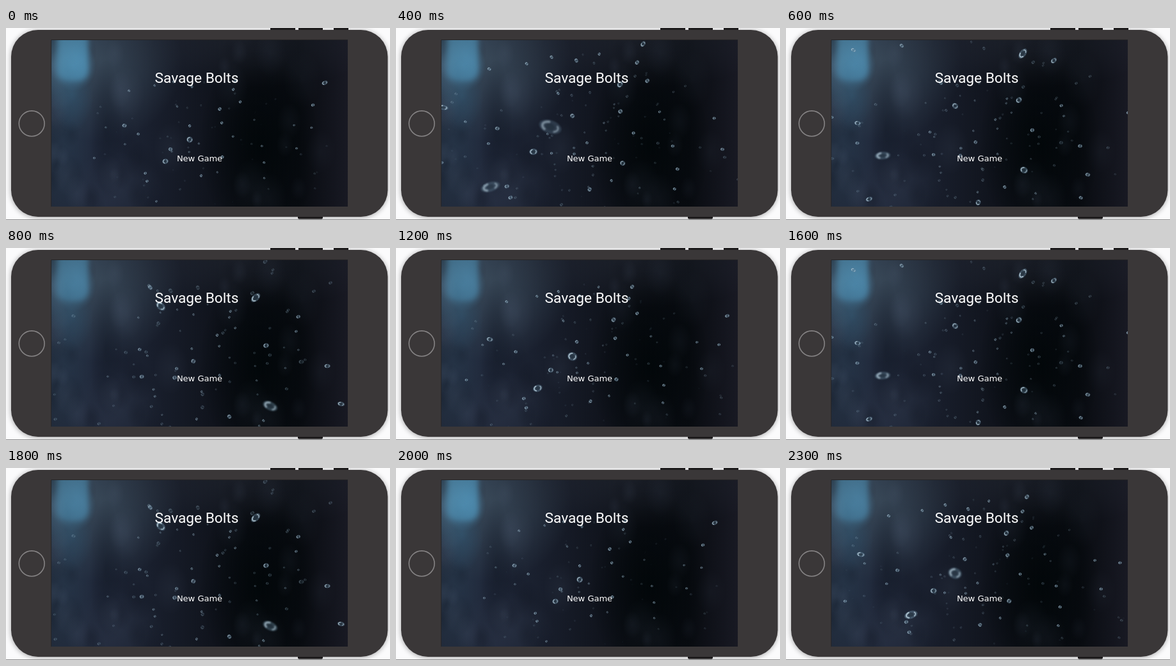
These frames come from a looping animation (600 by 301 pixels, 2400 ms). An HTML page with a canvas:

```html
<!DOCTYPE html>
<html lang="en">
<head>
<meta charset="utf-8">
<title>Game start screen</title>
<style>
  html, body { margin: 0; width: 100%; height: 100%; overflow: hidden; background: #fff; }
  .stage { position: relative; width: 600px; height: 301px; overflow: hidden; }
  svg, canvas { position: absolute; left: 0; top: 0; display: block; }
  canvas { left: 71px; top: 19px; }
  .title { font: 400 22.7px Roboto, Inter, sans-serif; }
  .item { font: 13px "DejaVu Sans", sans-serif; }
  text { fill: #fff; text-anchor: middle; }
</style>
</head>
<body>
<div class="stage">
  <svg width="600" height="301">
    <defs>
      <filter id="soft" x="-10%" y="-10%" width="120%" height="120%">
        <feGaussianBlur stdDeviation="4"/>
      </filter>
    </defs>
    <rect width="600" height="301" fill="#fbfbfc"/>
    <rect x="8" y="4" width="588" height="293" rx="42" opacity=".36" filter="url(#soft)"/>
    <g fill="#1d1b1c">
      <rect x="413" y="-3" width="39" height="9" rx="2"/>
      <rect x="457" y="-3" width="38" height="9" rx="2"/>
      <rect x="512" y="-3" width="23" height="9" rx="2"/>
      <rect x="456" y="293" width="39" height="6.5" rx="2"/>
    </g>
    <path d="M0 300.5H600" stroke="#8b8b8c"/>
    <rect x="8" y="3" width="588.5" height="293" rx="42" fill="#3a3738"/>
    <circle cx="40.2" cy="149.8" r="19.9" fill="none" stroke="#858384" stroke-width="1.6"/>
    <rect x="70.5" y="18.5" width="463.5" height="261.5" fill="#151617"/>
  </svg>
  <canvas id="screen" width="463" height="261"></canvas>
  <svg width="600" height="301">
    <text class="title" x="298" y="85.5">Savage Bolts</text>
    <text class="item" x="302.5" y="209">New Game</text>
  </svg>
</div>
<script>
const LOOP = 2400, CYCLE = 1000, STEP = 100;
const W = 463, H = 261;
const CX = 239, CY = 166;          // vanishing point of the rain

function seeded(seed) {
  return () => (seed = (seed * 16807) % 2147483647) / 2147483647;
}
const clamp = v => Math.max(0, Math.min(1, v));

// Offset from the vanishing point at the start of a cycle,
// and the seconds left until the drop meets the lens.
const drop = (x, y, reach) => ({ x, y, reach });

const leaders = [
  drop(-23, -10, .6), drop(-61, 24, .64), drop(-125, -32, .85),
  drop(-53, 5, .9), drop(24, -58, 1), drop(188, -99, .71)
];

// Random drops spread around the vanishing point, sparser further out.
function scatter(count, seed, near, far) {
  const rand = seeded(seed);
  return Array.from({ length: count }, (_, i) => {
    const angle = i * 2.4 + rand();
    const radius = .15 + .85 * rand();
    return drop(Math.cos(angle) * radius * 205, Math.sin(angle) * radius * 125,
      near + (far - near) * rand());
  });
}

const drops = [...leaders, ...scatter(34, 71, 1.05, 1.75)];
const specks = scatter(70, 7, 1.5, 2.3);

const g = document.getElementById("screen").getContext("2d");

function layer(paint) {
  const c = document.createElement("canvas");
  c.width = W;
  c.height = H;
  paint(c.getContext("2d"));
  return c;
}

function fade(ctx, x, y, rx, ry, rgb, alpha) {
  ctx.save();
  ctx.translate(x, y);
  ctx.scale(rx, ry);
  const grad = ctx.createRadialGradient(0, 0, 0, 0, 0, 1);
  grad.addColorStop(0, `rgba(${rgb},${alpha})`);
  grad.addColorStop(.5, `rgba(${rgb},${alpha * .55})`);
  grad.addColorStop(1, `rgba(${rgb},0)`);
  ctx.fillStyle = grad;
  ctx.fillRect(-1, -1, 2, 2);
  ctx.restore();
}

const backdrop = layer(ctx => {
  const base = ctx.createLinearGradient(0, 0, W, 0);
  ["#212b3b", "#20283a", "#191f2d", "#121620", "#0a0d13", "#080b10", "#181923"]
    .forEach((colour, i, all) => base.addColorStop(i / (all.length - 1), colour));
  ctx.fillStyle = base;
  ctx.fillRect(0, 0, W, H);
  fade(ctx, 75, 30, 130, 130, "70,90,104", .6);
  fade(ctx, 300, 0, 230, 75, "38,43,54", .55);
  fade(ctx, 325, 165, 95, 150, "1,6,8", .85);
  fade(ctx, 85, 140, 26, 110, "12,18,28", .4);
  fade(ctx, 25, 150, 45, 130, "44,66,88", .4);
  fade(ctx, 100, 235, 75, 60, "54,64,84", .35);

  // Drifts of mist, thinning out to the right.
  const rand = seeded(19);
  for (let i = 0; i < 60; i++) {
    const x = W * rand() ** 1.6, size = 8 + 22 * rand();
    fade(ctx, x, H * rand(), size, size * 1.5,
      i % 2 ? "84,98,122" : "6,10,18", .16 * (1 - .6 * x / W));
  }
});

const glow = layer(ctx => {
  ctx.filter = "blur(4px)";
  ctx.fillStyle = "rgba(78,146,184,.72)";
  ctx.beginPath();
  ctx.roundRect(9, -14, 49, 78, 16);
  ctx.fill();
  ctx.filter = "none";
  fade(ctx, 34, 40, 36, 40, "88,164,206", .5);
  fade(ctx, 10, 35, 45, 75, "84,134,162", .4);
  fade(ctx, 32, 85, 34, 60, "56,104,136", .4);
});

function arc(w, h, from = 0, to = 2 * Math.PI) {
  g.beginPath();
  g.ellipse(0, 0, w, h, 0, from, to);
}

function drawDrop({ x, y, reach }, t, strength) {
  const rest = reach - t;
  if (rest < .1) return;
  const zoom = reach / rest, dx = x * zoom, dy = y * zoom;
  const speed = Math.hypot(dx, dy) / rest;
  const size = 2.9 / rest;
  const w = size * (1 + Math.min(.25, speed / 1400));
  const h = size * (1 - Math.min(.4, speed / 1300));
  const alpha = strength * clamp(2.15 - rest) * clamp(rest / .32);
  if (alpha <= 0) return;

  g.save();
  g.translate(CX + dx, CY + dy);
  g.rotate(Math.atan(dy / (dx || 1)) * .8);
  g.globalAlpha = alpha;
  g.lineCap = "round";
  g.filter = `blur(${Math.min(1.2, .25 + size * .06)}px)`;
  g.fillStyle = "rgba(104,136,158,.5)";
  arc(w, h);
  g.fill();
  if (size > 4) {
    g.fillStyle = "rgba(12,22,32,.45)";
    arc(w * .4, h * .5);
    g.fill();
  }
  g.strokeStyle = "rgba(196,218,230,.85)";
  g.lineWidth = Math.max(.8, size * .26);
  arc(w * .7, h * .72, 2.2, 4.4);
  g.stroke();
  g.lineWidth *= .7;
  arc(w * .7, h * .7, -.6, .9);
  g.stroke();
  g.restore();
}

function draw(now) {
  const t = Math.floor(now % LOOP / STEP) * STEP;
  const phase = t % CYCLE / 1000;
  g.drawImage(backdrop, 0, 0);
  g.globalAlpha = .9 + .1 * Math.cos(phase * 4 * Math.PI);
  g.drawImage(glow, 0, 0);
  g.globalAlpha = 1;
  for (const s of specks) drawDrop(s, phase, .35);
  for (const d of drops) {
    drawDrop(d, phase - 1, .8);
    drawDrop(d, phase, .9);
  }
}

const start = performance.now();
function tick() {
  draw(performance.now() - start);
  requestAnimationFrame(tick);
}
tick();
</script>
</body>
</html>
```
